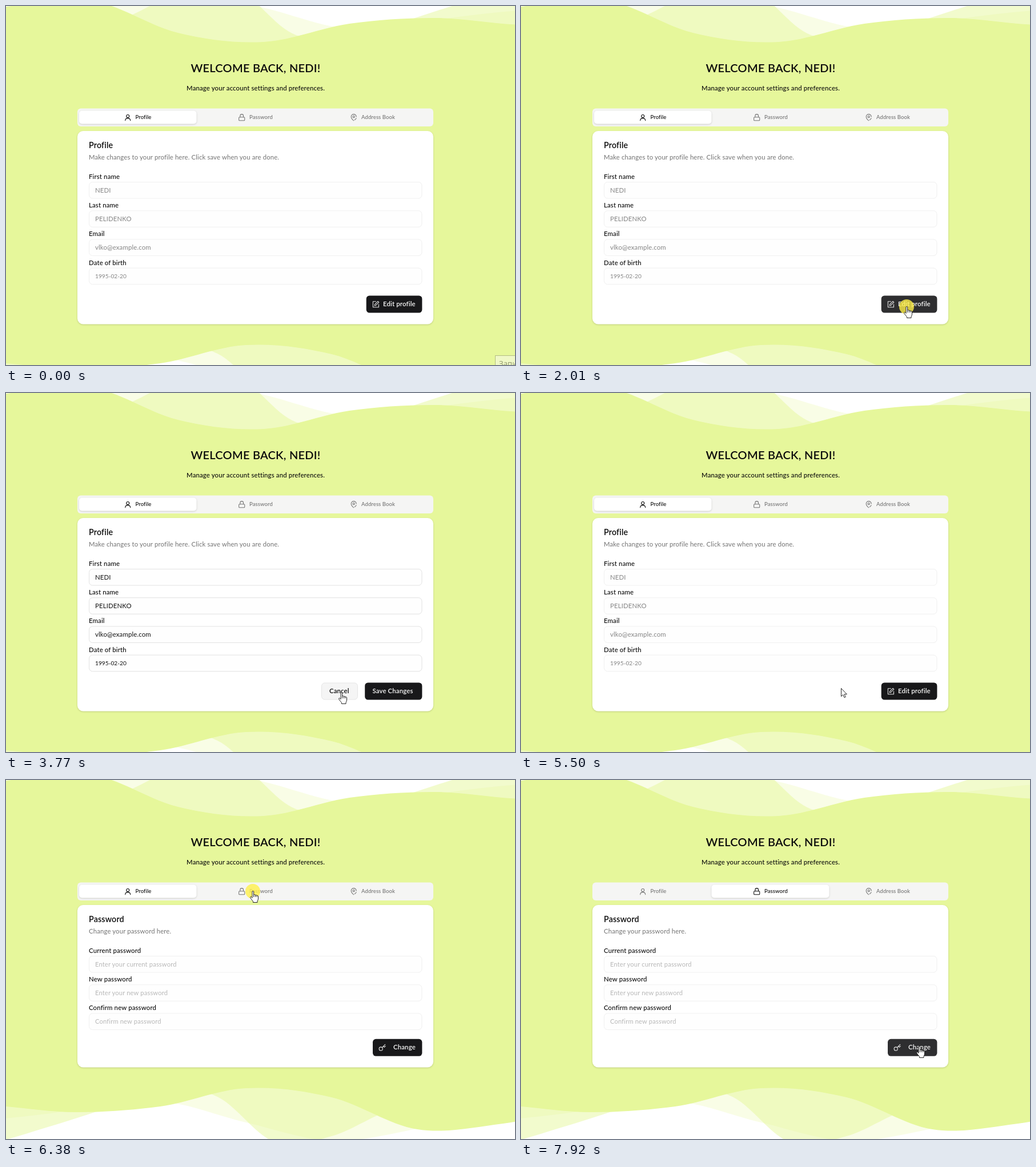
Recreate the animation shown at these times as an HTML page. Size 891 by 629 pixels, loop 8 s.

```html
<!DOCTYPE html>
<html lang="en">
<head>
<meta charset="utf-8">
<title>Account settings</title>
<style>
  html, body { margin: 0; width: 100%; height: 100%; overflow: hidden; background: #e6f79b; }
  svg { display: block; }
  text { font: 500 11.4px Lato, "Open Sans", sans-serif; letter-spacing: .14px; fill: #0c0c0c; }
  .title { font-size: 20px; font-weight: 600; letter-spacing: .25px; text-anchor: middle; }
  .mid { text-anchor: middle; }
  .head { font-size: 14.3px; font-weight: 600; }
  .tab { font-size: 9.5px; letter-spacing: .1px; fill: inherit; }
  .muted { font-size: 11.35px; font-weight: 400; fill: #737373; }
  .value { font-weight: 400; fill: inherit; }
  .date { font-size: 10.2px; letter-spacing: 0; }
  .hint { font-size: 11.2px; font-weight: 400; fill: #b8b8b8; }
  .btn { font-weight: 600; }
  .light { fill: #fafafa; }
  .note { font: 13px "Open Sans", sans-serif; fill: #8c9368; }
  .icon { fill: none; stroke: currentColor; stroke-width: 1.9; stroke-linecap: round; stroke-linejoin: round; }
  .raised { filter: drop-shadow(0 1px 1.5px rgba(0, 0, 0, .16)); }
  .dark { color: #e8e8e8; }
  #fields rect, #secrets rect { fill: #fefefe; stroke: currentColor; }
  #secrets { color: #f0f0f0; }
</style>
</head>
<body>
<svg id="stage" width="891" height="629" viewBox="0 0 891 629"></svg>
<script>
const LOOP = 8000, STEP = 70;
const OPEN = 2150, CLOSE = 4500, SWITCH = 6380;
const DARK = '#18181a', HOVER = '#2e2e30', GREEN = '#e6f79b';
const LEFT = 145, RIGHT = 728, ROW = 50.2;

// Smooth curve through evenly spaced heights, filled upwards
function wave(gap, heights, opacity) {
  const y = i => heights[Math.max(0, Math.min(heights.length - 1, i))];
  let d = `M-30,525V${y(0)}`;
  for (let i = 0; i < heights.length - 1; i++) {
    const out = (y(i + 1) - y(i - 1)) / 6, into = (y(i + 2) - y(i)) / 6;
    d += `c${gap / 3},${out} ${gap * 2 / 3},${y(i + 1) - y(i) - into} ${gap},${y(i + 1) - y(i)}`;
  }
  return `<path fill="${GREEN}" opacity="${opacity}" d="${d}V525Z"/>`;
}

const waves = '<rect x="-30" y="530" width="960" height="140" fill="#fff"/>' +
  wave(150, [595, 579, 563, 600, 632, 611, 575, 570], .25) +
  wave(100, [636, 609, 577, 540, 555, 634, 624, 580, 560, 555, 555], .5) +
  wave(150, [570, 582, 572, 540, 556, 612, 602, 575], 1);

const label = (x, y, str, cls = '') => `<text x="${x}" y="${y}" class="${cls}">${str}</text>`;
const box = (x, y, w, h, r, attrs = '') =>
  `<rect x="${x}" y="${y}" width="${w}" height="${h}" rx="${r}" ${attrs}/>`;
const icon = (x, y, shape) =>
  `<g class="icon" transform="translate(${x} ${y}) scale(.56)">${shape}</g>`;
const ring = (x, y, r) => `<circle cx="${x}" cy="${y}" r="${r}"/>`;
const line = d => `<path d="${d}"/>`;

const ICONS = {
  user: ring(12, 8, 4.5) + line('M4 22C4 12 20 12 20 22'),
  lock: box(3, 11, 18, 11, 2) + line('M7 11V7A5 5 0 0 1 17 7V11'),
  pin: ring(12, 10, 3) + line('M20 10A8 8 0 1 0 4 10C4 15 9 20 12 22M15 20L20 15'),
  pen: line('M12 3H3V21H21V12M18.5 2.5L21.5 5.5 12 15 8 16 9 12Z'),
  key: ring(7.5, 15.5, 5.5) + line('M11.5 11.5L21 2M15.5 7.5L18.5 10.5 22 7')
};

const rows = entries => entries.map(([name, content, cls], i) => {
  const y = 308.5 + i * ROW;
  return label(LEFT, y - 5.5, name) + box(LEFT + .5, y, RIGHT - LEFT - .5, 28.6, 6) +
    label(LEFT + 11, y + 18, content, cls);
}).join('');

const heading = (title, about) => label(LEFT, 249, title, 'head') + label(LEFT, 269, about, 'muted');

const tab = (id, x, glyph, name) =>
  `<g id="${id}">${icon(x - 20, 188.5, ICONS[glyph])}${label(x, 198, name, 'tab')}</g>`;

// Dark button aligned to the right edge of the form
const action = (id, y, width, textX, name, glyph) => `<g class="dark">
  ${box(RIGHT - width, y, width + .4, 30, 5.5, `id="${id}"`)}
  ${glyph ? icon(RIGHT - width + 10, y + 8.5, ICONS[glyph]) : ''}
  ${label(textX, y + 18, name, 'btn light')}</g>`;

document.getElementById('stage').innerHTML = `
  <rect width="891" height="629" fill="${GREEN}"/>
  <g transform="translate(871 603) rotate(180)">${waves}</g>
  <g id="footer">${waves}</g>
  ${label(437, 115.5, 'WELCOME BACK, NEDI!', 'title')}
  ${label(437, 148, 'Manage your account settings and preferences.', 'mid')}
  ${box(125, 179.5, 623, 31.5, 6, 'fill="#f5f5f4"')}
  <g class="raised" fill="#fff">
    ${box(128, 183.5, 205.5, 23, 5, 'id="pillA"')}
    ${box(333.5, 183.5, 206, 23, 5, 'id="pillB"')}
  </g>
  ${tab('tabA', 226.5, 'user', 'Profile')}
  ${tab('tabB', 426, 'lock', 'Password')}
  <g fill="#737373" color="#737373">${tab('tabC', 622, 'pin', 'Address Book')}</g>
  <g class="raised">${box(125, 219, 623, 338.5, 10, 'id="card" fill="#fff"')}</g>
  <g id="profile">
    ${heading('Profile', 'Make changes to your profile here. Click save when you are done.')}
    <g id="fields">${rows([
      ['First name', 'NEDI', 'value'],
      ['Last name', 'PELIDENKO', 'value'],
      ['Email', 'vlko@example.com', 'value'],
      ['Date of birth', '1995-02-20', 'value date']
    ])}</g>
    <g id="reading">${action('editBtn', 507.5, 97.3, 660, 'Edit profile', 'pen')}</g>
    <g id="editing">
      ${box(552.5, 508, 63, 29, 5.5, 'id="cancelBtn" stroke="#e5e5e5"')}
      ${label(566, 525.5, 'Cancel', 'btn')}
      ${action('saveBtn', 507.5, 99.8, 641.5, 'Save Changes')}
    </g>
  </g>
  <g id="password">
    ${heading('Password', 'Change your password here.')}
    <g id="secrets">${rows([
      ['Current password', 'Enter your current password', 'hint'],
      ['New password', 'Enter your new password', 'hint'],
      ['Confirm new password', 'Confirm new password', 'hint']
    ])}</g>
    ${action('changeBtn', 453.8, 86, 678, 'Change', 'key')}
  </g>
  <g id="note">
    ${box(856.5, 612.5, 60, 30, 0, 'fill="#eff8c6" stroke="#b3bd83"')}
    ${label(863, 631, 'Запись', 'note')}
  </g>
  <circle id="press" r="13" fill="#fff04a" opacity=".8"/>
  <g fill="#fff" stroke="#111" stroke-width=".9" stroke-linejoin="round">
    <path id="arrow" d="M.5 .5V14.6L3.7 11.6 6 16.6 8.2 15.6 6 10.8H10.4Z"/>
    <path id="hand" d="M4 2Q4 .5 5.3 .5T6.6 2V7.5Q7 6.4 8.2 6.7T9.4 8Q10 7.2 11 7.5T12 8.8Q12.6 8 13.5 8.4T14.5 10V14Q14.5 16 13 18V20.5H5.5V18.5Q3.5 16.5 .8 12.5 .2 11 1.2 10.5T4 12.5ZM6.6 7.5V11M9.4 8V11M12 8.8V11"/>
  </g>`;

const el = {};
document.querySelectorAll('#stage [id]').forEach(node => el[node.id] = node);

// Pull places the bend as a share of the way across and down
const ENTRY = [730, 645];
const MOVES = [
  { at: 780, ms: 700, to: [675, 527], pull: [1.2, .78] },
  { at: 3010, ms: 760, to: [587, 525], pull: [.5, .5] },
  { at: 5500, ms: 750, to: [432, 195], pull: [1, .09] },
  { at: 7040, ms: 750, to: [697, 467], pull: [.5, .5] }
];
const PRESSES = [[2010, OPEN], [CLOSE, CLOSE + STEP], [SWITCH, SWITCH + STEP]];

function pointer(t) {
  const i = MOVES.filter(m => t >= m.at).length - 1;
  if (i < 0) return null;
  const { at, ms, to, pull } = MOVES[i];
  const from = i ? MOVES[i - 1].to : ENTRY;
  const last = Math.round(ms / STEP);
  const step = Math.min(last, Math.floor((t - at + 15) / ms * last));
  const u = (step + 1) / (last + 1);
  const p = u + u * u - u * u * u;
  return from.map((v, axis) => v + (to[axis] - v) * (2 * p * (1 - p) * pull[axis] + p * p));
}

const set = (node, name, value) => node.setAttribute(name, value);
const show = (node, on) => { node.style.display = on ? '' : 'none'; };
const clamp = v => Math.max(0, Math.min(1, v));

function draw(t) {
  const pos = pointer(t);
  const [x, y] = (pos || [-99, -99]).map(Math.round);
  const edit = t >= OPEN && t < CLOSE;
  const secure = t >= SWITCH;
  const pressed = PRESSES.some(([a, b]) => t >= a && t < b);

  show(el.note, t < STEP);
  set(el.footer, 'transform', `translate(0 ${secure ? 0 : 54})`);
  set(el.card, 'height', secure ? 284.5 : 338.5);
  show(el.profile, !secure);
  show(el.password, secure);
  show(el.reading, !edit);
  show(el.editing, edit);
  set(el.fields, 'fill', edit ? '#111' : '#858585');
  el.fields.style.color = edit ? '#e2e2e2' : '#f0f0f0';

  let hand = pressed || (x > 128 && x < 745 && y > 183 && y < 207);
  const paint = (node, active, idle, hot) => {
    const b = node.getBBox();
    const over = active && x >= b.x && x < b.x + b.width && y >= b.y && y < b.y + b.height;
    set(node, 'fill', over ? hot : idle);
    hand ||= over;
  };
  paint(el.editBtn, !edit && !secure, DARK, HOVER);
  paint(el.saveBtn, edit, DARK, HOVER);
  paint(el.cancelBtn, edit, '#fff', '#f5f5f5');
  paint(el.changeBtn, secure, DARK, HOVER);

  const k = clamp(Math.floor((t - SWITCH) / 66) / 3);
  set(el.pillA, 'opacity', 1 - k);
  set(el.pillB, 'opacity', k);
  [[el.tabA, 1 - k], [el.tabB, k]].forEach(([node, on]) => {
    const v = Math.round(115 - 105 * on);
    node.style.fill = node.style.color = `rgb(${v},${v},${v})`;
  });

  show(el.hand, pos && hand);
  show(el.arrow, pos && !hand);
  show(el.press, pressed);
  set(el.hand, 'transform', `translate(${x - 5} ${y - 1})`);
  set(el.arrow, 'transform', `translate(${x} ${y})`);
  set(el.press, 'transform', `translate(${x} ${y})`);
}

const began = performance.now();
function tick() {
  draw((performance.now() - began) % LOOP);
  requestAnimationFrame(tick);
}
tick();
</script>
</body>
</html>
```
